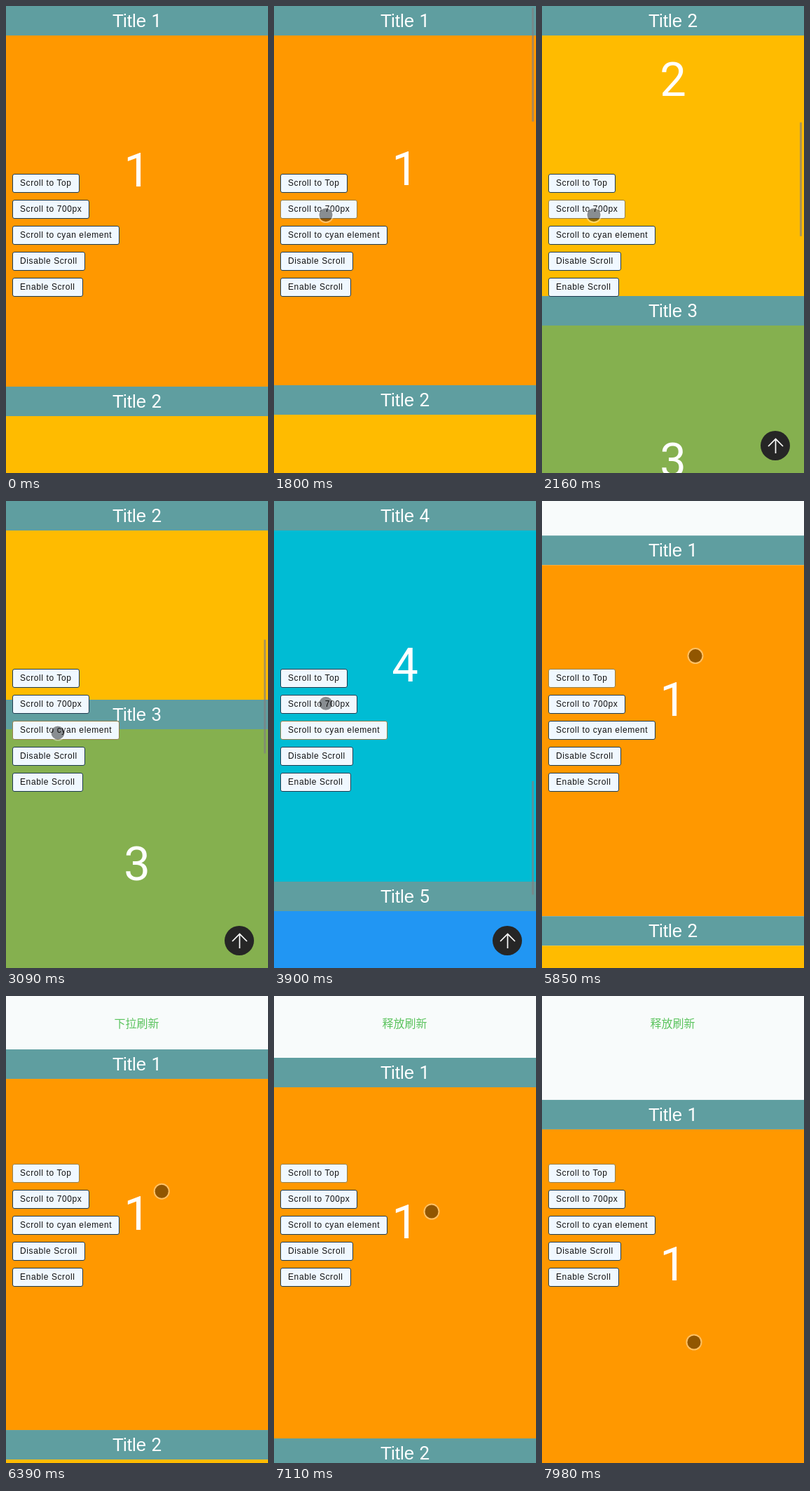
Animation, 374 px wide and 665 px high, one loop 8000 ms. Source, as an HTML page:

```html
<!DOCTYPE html>
<html lang="en">
<head>
<meta charset="utf-8">
<title>Scroll demo</title>
<style>
  html, body { margin: 0; width: 100%; height: 100%; overflow: hidden; }
  body { position: relative; background: #f8fbfb; font-family: "Liberation Sans", Arial, sans-serif; }
  #hint {
    position: absolute; top: 26px; width: 373px; text-align: center;
    font: 16px/24px "Noto Sans CJK SC", "Noto Sans CJK", sans-serif; color: #5cc45f;
  }
  #page { position: absolute; z-index: 0; width: 374px; height: 665px; overflow: hidden; }
  .title {
    position: sticky; top: 0; z-index: 1; height: 42px;
    background: cadetblue; color: #fff; font-size: 26px; line-height: 42px; text-align: center;
  }
  .panel { height: 500px; color: #fff; font-size: 67px; line-height: 384px; text-align: center; }
  .digit { font-family: Roboto, sans-serif; }
  #buttons { position: absolute; z-index: 1; left: 9px; top: 239px; }
  .button {
    width: max-content; margin-bottom: 10px; padding: 5px 10px;
    border: 1px solid #1d3b50; border-radius: 3px; background: aliceblue;
    color: #111; font-size: 12px; line-height: 15px; letter-spacing: .6px;
  }
  .button.active { border-color: #94804c; }
  #bar { position: absolute; z-index: 1; left: 368px; top: 2px; width: 3px; background: rgba(128, 128, 128, .65); }
  #toTop { position: absolute; z-index: 1; left: 312px; top: 605px; }
  #cursor {
    position: absolute; z-index: 2; left: -9.5px; top: -9.5px; width: 19px; height: 19px; border-radius: 50%;
    background: rgba(0, 0, 0, .43); box-shadow: 0 0 0 2px rgba(255, 255, 255, .4);
  }
</style>
</head>
<body>
<div id="hint"></div>
<div id="page"></div>
<div id="buttons"></div>
<div id="bar"></div>
<svg id="toTop" width="42" height="42">
  <circle cx="21" cy="21" r="21" fill="#262626"/>
  <path d="M21.5 32V11.5M11 22L21.5 11.5L32 22" fill="none" stroke="#fff" stroke-width="1.7"/>
</svg>
<div id="cursor"></div>
<script>
const LOOP = 8000, VIEW = 665, SECTION = 542;
const colors = ["#ff9800", "#ffbb00", "#85b04f", "#00bcd4", "#2196f3"];
const labels = ["Scroll to Top", "Scroll to 700px", "Scroll to cyan element", "Disable Scroll", "Enable Scroll"];
const clicks = [
  { start: 1783, to: 700, button: 1 },
  { start: 2974, to: 3 * SECTION, button: 2 },
  { start: 4260, to: 0, button: 0 },
];
const firstClick = clicks[0].start;

const el = id => document.getElementById(id);
const clamp = v => Math.min(1, Math.max(0, v));
const ramp = (t, from, to) => clamp((t - from) / (to - from));

function add(parent, className, html) {
  const node = document.createElement("div");
  node.className = className;
  node.innerHTML = html;
  parent.append(node);
  return node;
}

// cubic-bezier(.42, 0, .58, 1), solved for x by bisection
function easeInOut(x) {
  let lo = 0, hi = 1;
  for (let i = 0; i < 24; i++) {
    const s = (lo + hi) / 2, r = 1 - s;
    if (1.26 * s * r * r + 1.74 * s * s * r + s ** 3 < x) lo = s; else hi = s;
  }
  return lo * lo * (3 - 2 * lo);
}

// Smooth scrolling lasts in proportion to the square root of the distance
function scrollAt(t) {
  let scroll = 0;
  for (const { start, to } of clicks) {
    if (t < start) break;
    const distance = to - scroll;
    const duration = Math.sqrt(Math.abs(distance)) / 60 * 1000;
    scroll += distance * easeInOut(ramp(t, start, start + duration));
  }
  return scroll;
}

// How far the pointer has been dragged down
const dragAt = t =>
  127 * ramp(t, 5667, 5940) + 30 * ramp(t, 5970, 6750) +
  30 * ramp(t, 6870, 7350) + 171 * ramp(t, 7680, 7980);

// The page resists more the further it is pulled
const damped = drag => 400 * drag / (drag + 610);

function cursorAt(t) {
  const enter = ramp(t, 510, 1590), reach = ramp(t, 5160, 5667);
  const x = 73.5 + 278 * (1 - enter) ** 1.7 + 145 * reach
    + 6 * ramp(t, 5970, 6750) - 8 * ramp(t, 7680, 7980);
  const y = 88 + 209 * enter + 412 * Math.sin(Math.PI * enter ** .4)
    + 32.5 * ramp(t, 2430, 2730) - 78 * ramp(t, 3660, 4110)
    - 117 * reach + dragAt(t);
  return [x, y];
}

const page = el("page"), bar = el("bar"), hint = el("hint"), cursor = el("cursor");
colors.forEach((color, i) => {
  add(page, "title", `Title <span class="digit">${i + 1}</span>`);
  add(page, "panel digit", i + 1).style.background = color;
});
const buttons = labels.map(label => add(el("buttons"), "button", label));
const barScale = (VIEW - 4) / (SECTION * colors.length);
bar.style.height = VIEW * barScale + "px";

function draw() {
  const t = performance.now() % LOOP;
  const scroll = scrollAt(t), pull = damped(dragAt(t)), [x, y] = cursorAt(t);

  page.scrollTop = Math.round(scroll);
  page.style.transform = `translateY(${pull}px)`;
  hint.textContent = pull < 84 ? "下拉刷新" : "释放刷新";
  hint.style.opacity = ramp(pull, 50, 70);

  bar.style.transform = `translateY(${scroll * barScale}px)`;
  bar.style.opacity = t < firstClick ? 0 : 1 - ramp(t, 5130, 5380);
  el("toTop").style.display = scroll > 400 ? "" : "none";

  const latest = clicks.filter(click => t >= click.start).pop();
  buttons.forEach((button, i) => button.classList.toggle("active", latest?.button === i));

  cursor.style.display = t < 510 ? "none" : "";
  cursor.style.transform = `translate(${x}px, ${y}px)`;
  requestAnimationFrame(draw);
}
draw();
</script>
</body>
</html>
```
